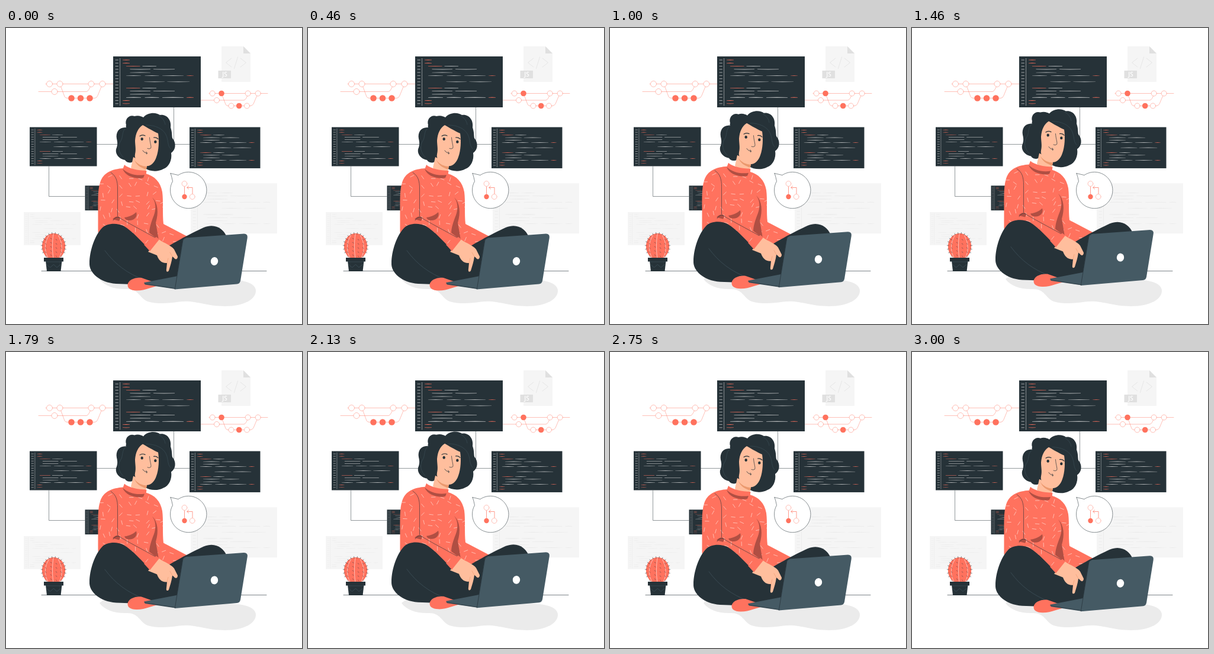
Write an HTML page with a canvas that moves like this. It is 500 by 500 pixels and loops after 3040 ms.

```html
<!DOCTYPE html>
<html lang="en">
<head>
<meta charset="utf-8">
<title>Developer at work</title>
<style>
html, body { margin: 0; width: 100%; height: 100%; overflow: hidden; background: #fff; }
canvas { display: block; width: 100vw; height: 100vh; }
</style>
</head>
<body>
<canvas id="stage"></canvas>
<script>
const LOOP = 3040, DELAY = 500, RISE = 1500, LIFT = 10;
const CORAL = '#ff725e', DARK = '#263238', SLATE = '#455a64', SHADE = '#b04f43',
      SKIN = '#ffbe9d', SKIN_SHADE = '#eb996e', PALE = '#f5f5f5', GREY = '#e0e0e0';

const canvas = document.getElementById('stage');
const ctx = canvas.getContext('2d');
const scale = Math.max(1, window.devicePixelRatio || 1);
canvas.width = canvas.height = 500 * scale;
ctx.lineCap = ctx.lineJoin = 'round';

function fill(d, color) {
  ctx.fillStyle = color;
  ctx.fill(new Path2D(d));
}
function line(d, color, width = 0.7) {
  ctx.strokeStyle = color;
  ctx.lineWidth = width;
  ctx.stroke(new Path2D(d));
}
function oval(x, y, rx, ry, color, angle = 0) {
  ctx.beginPath();
  ctx.ellipse(x, y, rx, ry, angle, 0, Math.PI * 2);
  ctx.fillStyle = color;
  ctx.fill();
}
function node(x, y, r, solid) {
  oval(x, y, r, r, solid ? CORAL : '#fff');
  if (solid) return;
  ctx.strokeStyle = CORAL;
  ctx.lineWidth = 0.45;
  ctx.stroke();
}
function random(seed) {
  return () => (seed = (seed * 16807) % 2147483647) / 2147483647;
}

// row, start, end, accent
const block = [
  [0, 22, 45.5, 1], [0, 49.5, 73], [1, 28.5, 63], [1, 68, 104], [2, 28.5, 63],
  [3, 22, 47], [3, 53.5, 77.5], [3, 83, 119], [3, 124, 136, 1]
];
const code = [
  [0, 16, 28, 1], [1, 16, 28, 1], ...block.map(([r, ...rest]) => [r + 2, ...rest]),
  [7, 52.5, 87], [7, 91.5, 129], ...block.map(([r, ...rest]) => [r + 9, ...rest]),
  [13, 16, 28, 1], [14, 16, 28, 1]
];

function panel(x, y, w, back, ink, accent) {
  ctx.save();
  ctx.translate(x, y);
  ctx.scale(w / 148, w / 148);
  ctx.fillStyle = back;
  ctx.fillRect(0, 0, 148, 86);
  line('M11.6 3.5V83', ink, 0.55);
  const rowY = r => 6 + r * 5.27;
  for (let r = 0; r < 15; r++) line(`M4 ${rowY(r)}H8.5`, ink, 0.65);
  for (const [r, a, b, hot] of code) {
    const y = rowY(r), mid = (a + b) / 2;
    fill(`M${a} ${y - 0.2}L${mid} ${y - 0.4}L${b} ${y - 0.2}V${y + 0.2}L${mid} ${y + 0.4}L${a} ${y + 0.2}Z`,
      hot ? accent : ink);
  }
  ctx.restore();
}

function fileIcon() {
  fill('M364 31H401L413 43V91H364Z', PALE);
  fill('M401 31V43H413Z', GREY);
  line('M381 51L371.5 58.5L381 66M391.5 49L385.5 68.5M396 51L405.5 58.5L396 66', GREY, 0.7);
  fill('M358.5 72H380V85H358.5Z', GREY);
  ctx.fillStyle = '#fff';
  ctx.font = '600 10px "Open Sans", sans-serif';
  ctx.textAlign = 'center';
  ctx.fillText('JS', 369.5, 82.4);
}

function branches() {
  line('M67 94.5H182M55 107.5H136Q140 107 144 94.5M91 94.5L99 116Q100 118.5 104 118.5H150Q153 118.5 155 114L163 94.5', CORAL, 0.45);
  for (const x of [73.5, 91, 144, 163]) node(x, 94.5, 5);
  node(82, 107.5, 5);
  for (const x of [110.5, 126, 141.5]) node(x, 118.5, 5.3, true);

  line('M343 110.5H442M329 122H402Q406 121 409 110.5M364 110.5L371 129Q372 131.5 375 131.5H413Q416 131.5 418 128L425.5 110.5', CORAL, 0.45);
  for (const x of [348.7, 408.7, 425.7]) node(x, 110.5, 4.5);
  node(364, 110.5, 4.8, true);
  node(356, 122, 4.5);
  node(380.5, 131.5, 4.5);
  node(407, 131.5, 4.5);
  node(393.7, 131.5, 4.8, true);
}

function bubble() {
  const d = 'M278 245.5L291 248.6A30.7 30.7 0 1 1 281.5 258.9Q280 251 278 245.5Z';
  fill(d, '#fff');
  line(d, DARK, 0.55);
  line('M301.5 268V281M315 280V269.5H306M308.5 267L305.8 269.5L308.5 272', CORAL, 0.7);
  node(301.5, 263, 4.4);
  node(314.7, 285, 4.4);
  node(301.5, 285, 4.2, true);
}

function cactus() {
  oval(80.5, 369, 19.7, 22.3, CORAL);
  line('M80 348C78 360 78 378 80 389M73 350C64 362 65 378 71 388M88 350C96 362 96 378 90 388', '#fff', 0.55);
  for (let i = 0; i < 16; i++) {
    const a = Math.PI * (0.85 + i * 1.3 / 15);
    const c = Math.cos(a), s = Math.sin(a);
    line(`M${80.5 + c * 18.5} ${369 + s * 21}L${80.5 + c * 21.3} ${369 + s * 23.8}`, DARK, 0.55);
  }
  for (let r = 0; r < 5; r++) {
    for (const x of [67, 76, 85, 93]) {
      const y = 355 + r * 7 + (x % 2) * 2;
      line(`M${x - 0.8} ${y}L${x + 1} ${y + 1.4}`, DARK, 0.5);
    }
  }
  fill('M67 393H94.5L92.5 411H69Z', DARK);
  fill('M64 388H97V394.5H64Z', DARK);
  line('M67.5 395H94', SLATE, 0.5);
  line('M69 400L74.5 404.5L80.5 399.5L86 404.5L92 399.5', SLATE, 0.6);
}

function scenery() {
  fileIcon();
  panel(30, 311, 96, PALE, '#e6e6e6', '#e6e6e6');
  panel(312, 262.3, 146, PALE, '#e6e6e6', '#e6e6e6');
  line('M283.5 134V196.5M153 196.5H310M72.5 234V284.5H133', DARK, 0.5);
  branches();
  panel(181, 48, 148, DARK, '#e0e0e0', CORAL);
  panel(40, 167.5, 113.5, DARK, '#e0e0e0', CORAL);
  panel(310, 167.5, 119.5, DARK, '#e0e0e0', CORAL);
  panel(133.5, 266.3, 72, DARK, '#e0e0e0', CORAL);
  bubble();
  line('M60 410.5H440', DARK, 0.6);
  fill('M158 424C166 436 185 442 205 441C223 441 225 454 237 461C251 467 275 465 292 462.5C320 459 335 470 370 470C402 470 423 458 422 443C421 432 405 427 390 426L300 415L170 415Z', '#ebebeb');
  cactus();
}

function sweater() {
  const body = 'M198 237C180 238 164 244 159 261C154 277 156 294 155.5 345L190 372L242 386L280 366L306 352L266 331C264 315 266 292 264 277C261 260 251 250 236 246Z';
  fill(body, CORAL);
  ctx.save();
  ctx.clip(new Path2D(body));
  const rnd = random(77);
  for (let y = 250; y < 372; y += 13) {
    for (let x = 158; x < 290; x += 15) {
      const px = x + rnd() * 9, py = y + rnd() * 8, a = rnd() * Math.PI;
      const dx = Math.cos(a) * 3.3, dy = Math.sin(a) * 3.3;
      line(`M${px - dx} ${py - dy}L${px + dx} ${py + dy}`, '#ffe3db', 0.65);
    }
  }
  fill('M247 286C255 297 253 310 248 321C244 332 242 339 242 346L258 358L253 329C258 312 257 296 247 286Z', SHADE);
  fill('M200 320C210 319 217 314 220 311C223 319 216 325 209 325C204 325 201 323 200 320Z', SHADE);
  fill('M180 323C184 318 190 317 193 321L191 326Z', SHADE);
  ctx.restore();
  line('M177 244C186 250 188.5 258 188.5 272V318M181 325C184 319 191 318 194 322C216 335 240 347 257 357', DARK, 0.6);
}

function head() {
  fill('M203 164C200 154 208 146 217 149C223 147 229 149 232 151C239 142 254 142 260 147C271 145 280 155 278 168C281 177 280 182 281 186C288 194 287 206 279 211C281 223 275 235 266 238C255 244 243 242 235 237L217 224C211 230 203 227 201 223C189 221 183 210 187 202C189 196 188 191 187 187C185 176 191 167 203 168Q202 166 203 164Z', DARK);
  fill('M215 218L211 236C218 243 229 244 236 241L239 230Z', SKIN);
  fill('M217 223C222 230 230 234 238 234L237 239C227 236 220 231 217 223Z', SKIN_SHADE);
  fill('M218 190C219 178 223 169 231 164C238 168 248 174 257 178C259 191 258 207 254 218C250 230 241 236 233 232C224 228 216 222 218 213C220 205 218 198 218 190Z', SKIN);
  oval(229.7, 187.5, 2.2, 2.5, DARK);
  oval(252.3, 192.2, 2.2, 2.5, DARK);
  line('M226 182.5Q230 179.5 235 182M249.5 185Q254 184 257 187.5', DARK, 1.2);
  line('M242.5 185C243 194 246 200 244.5 203Q242 205 239 203.5', DARK, 0.7);
  line('M231 207C233 210 236 211.5 238.5 211.5M236.8 209Q238.5 210 237.8 213', DARK, 0.8);
  line('M203 168C194 176 199 184 193 192C188 200 191 212 198 218M237 164C252 164 265 170 270 180C275 190 272 198 278 204M258 148Q268 154 269 163', SLATE, 0.45);
  fill('M200 231C206 237 223 241 237.5 241L236 252C222 256 203 249 197 239Z', CORAL);
  fill('M197 238C207 247 220 250 234 248L232 253C220 256 202 251 197 238Z', SHADE);
}

function legs() {
  fill('M252 383C276 366 312 347 334 337C354 329 367 340 372 351L340 430L236 429Z', DARK);
  fill('M141 397C141 377 150 350 162 338C170 329 188 329 198 334C214 343 230 362 244 376L290 375L292 420L237 431L215 433L186 432C158 430 140 413 141 397Z', DARK);
  line('M167 376C184 399 205 415 233 425', SLATE, 0.6);
  fill('M205.5 434C206 426 217 421 229 422L263 434C246 437 235 444 220 443.5C210 443 205.5 440 205.5 434Z', CORAL);
}

function laptop() {
  fill('M233 430L290 419L300 435L286 441L235 433.5Z', SLATE);
  line('M234 432L285 440', DARK, 0.6);
  fill('M303.5 354.5L402 347.5Q408.5 347.5 407.8 354L396 427Q395 432 390 432.5L285 441.5L298.5 359Q299.5 355 303.5 354.5Z', SLATE);
  line('M303 355Q299.5 355.5 298.8 359L285.3 441', DARK, 0.7);
  oval(352, 394, 6.2, 7, '#fff', 0.1);
}

function hand() {
  fill('M240 378L258 357C268 364 279 367 284 374L290 386C290 391 286 392 283.5 388L281 386C280 395 277 403 275 410C273 413 270 412 271 407L272 397C263 398 258 392 255 384Z', SKIN);
  line('M281 386L277 379M272 397L274 389', SKIN_SHADE, 0.6);
  fill('M233 366L254 353L259 357L243 377Z', CORAL);
}

function shift(t) {
  const p = t - DELAY;
  if (p <= 0) return 0;
  return -LIFT * (1 - Math.abs(p - RISE) / RISE);
}

function draw(now) {
  ctx.setTransform(scale, 0, 0, scale, 0, 0);
  ctx.fillStyle = '#fff';
  ctx.fillRect(0, 0, 500, 500);
  scenery();
  ctx.translate(0, shift(now % LOOP));
  sweater();
  head();
  legs();
  laptop();
  hand();
}

const start = performance.now();
function tick() {
  draw(performance.now() - start);
  requestAnimationFrame(tick);
}
tick();
</script>
</body>
</html>
```
